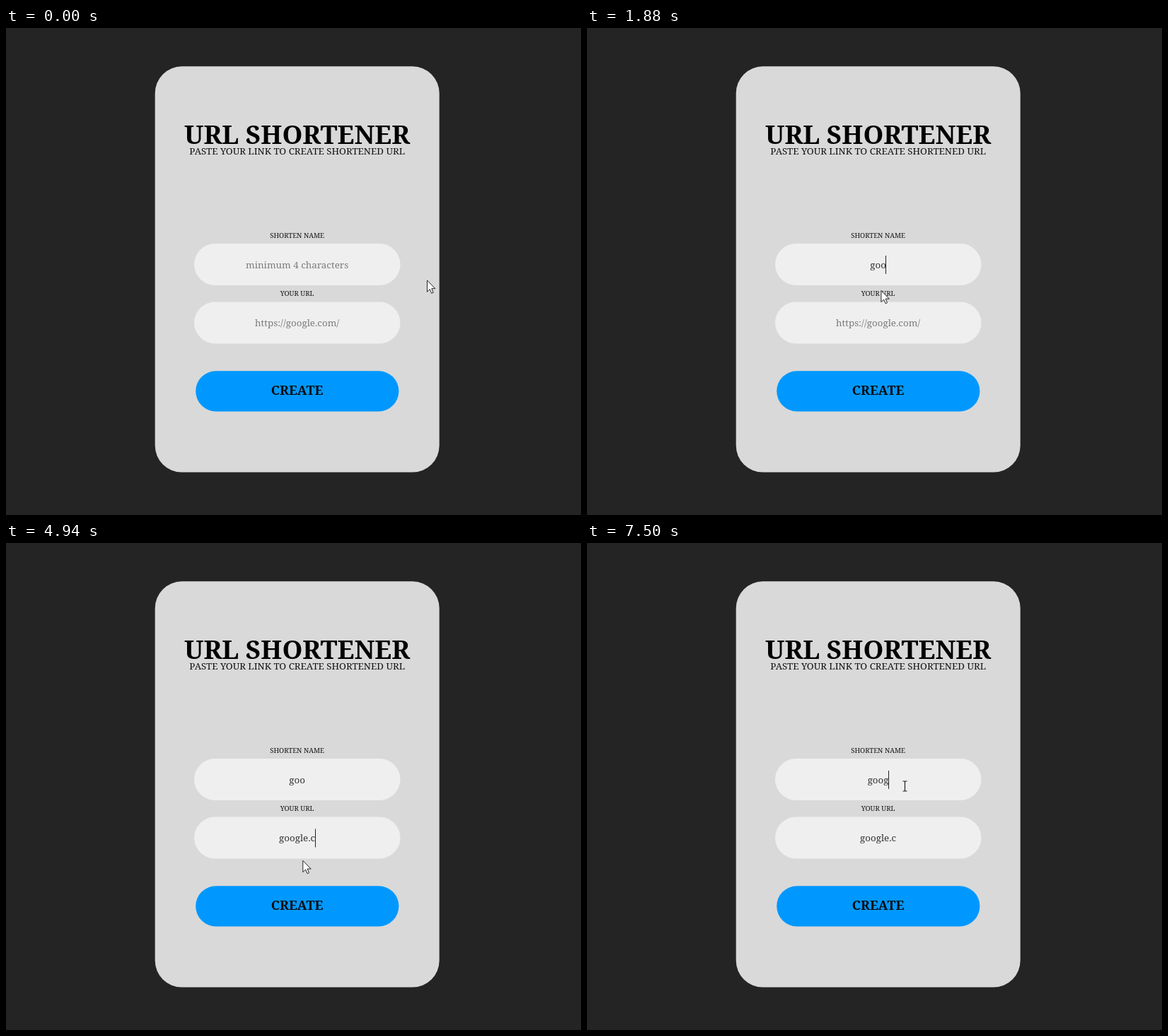
These frames come from a looping animation (813x689 px, 8000 ms). An HTML page with a canvas:

```html
<!DOCTYPE html>
<html lang="en">
<head>
<meta charset="utf-8">
<title>URL shortener</title>
<style>
  html, body { margin: 0; width: 100%; height: 100%; overflow: hidden; background: #242424; }
  canvas { display: block; }
</style>
</head>
<body>
<canvas width="813" height="689"></canvas>
<script>
const ctx = document.querySelector('canvas').getContext('2d');
const LOOP = 8000, BLINK = 530, CENTER = 411.6;
const FIELD_FONT = 13.4;

// time, name, url, focused field (0 = none), error shown
const states = [
  [0, '', '', 0],
  [580, '', '', 1],
  [1220, 'g', '', 1],
  [1420, 'go', '', 1],
  [1560, 'goo', '', 1],
  [2180, 'goo', '', 2],
  [2580, 'goo', 'g', 2],
  [2800, 'goo', 'go', 2],
  [3010, 'goo', 'goo', 2],
  [3760, 'goo', 'goog', 2],
  [3940, 'goo', 'googl', 2],
  [4120, 'goo', 'google', 2],
  [4320, 'goo', 'google.', 2],
  [4480, 'goo', 'google.c', 2],
  [5280, 'goo', 'google.c', 0, true],
  [5860, 'goo', 'google.c', 1, true],
  [7500, 'goog', 'google.c', 1]
];

// pointer moves: start, end, from, to
const moves = [
  [20, 560, [595.5, 357], [414, 344]],
  [1700, 2180, [414, 344], [420, 430]],
  [3900, 4100, [420, 430], [421, 429.5]],
  [4800, 5240, [421, 429.5], [416, 511.5]],
  [5620, 6100, [416, 511.5], [449.5, 344]]
];

const arrow = new Path2D('M0 0V16.2L3.8 12.7L6.2 18.3L8.7 17.2L6.3 11.7H11.4Z');
const hand = new Path2D('M-1.6 1.2Q0-.8 1.6 1.2V7Q3.2 5.6 4.3 7.6Q6 6.6 6.8 8.5' +
  'Q9 7.8 9.2 10.2V15Q9 18 7.2 19V21.5H-1V19.3L-5.2 13Q-5.8 10.6-3.6 11L-1.6 13Z');
const handLines = new Path2D('M1.6 7V11M4.3 7.6V11M6.8 8.5V11.5');
const beam = new Path2D('M-3-7H-1Q0-7 0-6Q0-7 1-7H3M0-6V6M-3 7H-1Q0 7 0 6Q0 7 1 7H3');

function box(x, y, w, h, radius, color) {
  ctx.fillStyle = color;
  ctx.beginPath();
  ctx.roundRect(x, y, w, h, radius);
  ctx.fill();
}

function text(string, baseline, size, color = '#111', weight = 400) {
  ctx.font = `${weight} ${size}px "Noto Serif", serif`;
  ctx.fillStyle = color;
  ctx.fillText(string, CENTER, baseline);
}

function field(y, label, value, placeholder, caret) {
  text(label, y - 8.5, 9.6);
  box(266, y, 291.5, 59, 29.5, '#efefef');
  text(value || placeholder, y + 34.5, FIELD_FONT, value ? '#333' : '#7b7b7b');
  if (caret) {
    const x = Math.floor(CENTER + ctx.measureText(value).width / 2);
    ctx.fillStyle = '#222';
    ctx.fillRect(x, y + 17, 1, 26);
  }
}

function pointerAt(t) {
  const move = moves.findLast(m => t >= m[0]) || moves[0];
  const [start, end, from, to] = move;
  const p = Math.min(1, Math.max(0, (t - start) / (end - start)));
  const eased = p * p * (3 - 2 * p);
  return from.map((v, i) => v + (to[i] - v) * eased);
}

function drawPointer(x, y) {
  const within = (top, height) => x > 266 && x < 557 && y > top && y < top + height;
  ctx.save();
  ctx.translate(x, y);
  ctx.lineWidth = 1;
  ctx.strokeStyle = '#222';
  ctx.fillStyle = '#fff';
  if (within(305, 59) || within(387.5, 59)) {
    ctx.lineWidth = 1.2;
    ctx.stroke(beam);
  } else {
    const shape = within(485, 58) ? hand : arrow;
    ctx.fill(shape);
    ctx.stroke(shape);
    if (shape === hand) ctx.stroke(handLines);
  }
  ctx.restore();
}

function draw() {
  const t = performance.now() % LOOP;
  const [since, name, url, focus, error] = states.findLast(s => t >= s[0]);
  const caretOn = (t - since) % (2 * BLINK) < BLINK;

  ctx.textAlign = 'center';
  ctx.fillStyle = '#242424';
  ctx.fillRect(0, 0, 813, 689);
  box(210.7, 54.3, 402, 574.3, 38, '#d9d9d9');

  text('URL SHORTENER', 163.8, 36.7, '#000', 700);
  text('PASTE YOUR LINK TO CREATE SHORTENED URL', 179, 13.3);
  if (error) {
    text('Created name is too short and', 228.7, 19.4);
    text('input URL is not valid!', 251.7, 19.4);
  }
  field(305, 'SHORTEN NAME', name, 'minimum 4 characters', focus === 1 && caretOn);
  field(387.5, 'YOUR URL', url, 'https://google.com/', focus === 2 && caretOn);

  box(268.2, 485.2, 287.2, 57.2, 28.6, '#0098ff');
  text('CREATE', 519.4, 18.3, '#0a0a0a', 700);
  drawPointer(...pointerAt(t));
  requestAnimationFrame(draw);
}
draw();
</script>
</body>
</html>
```
